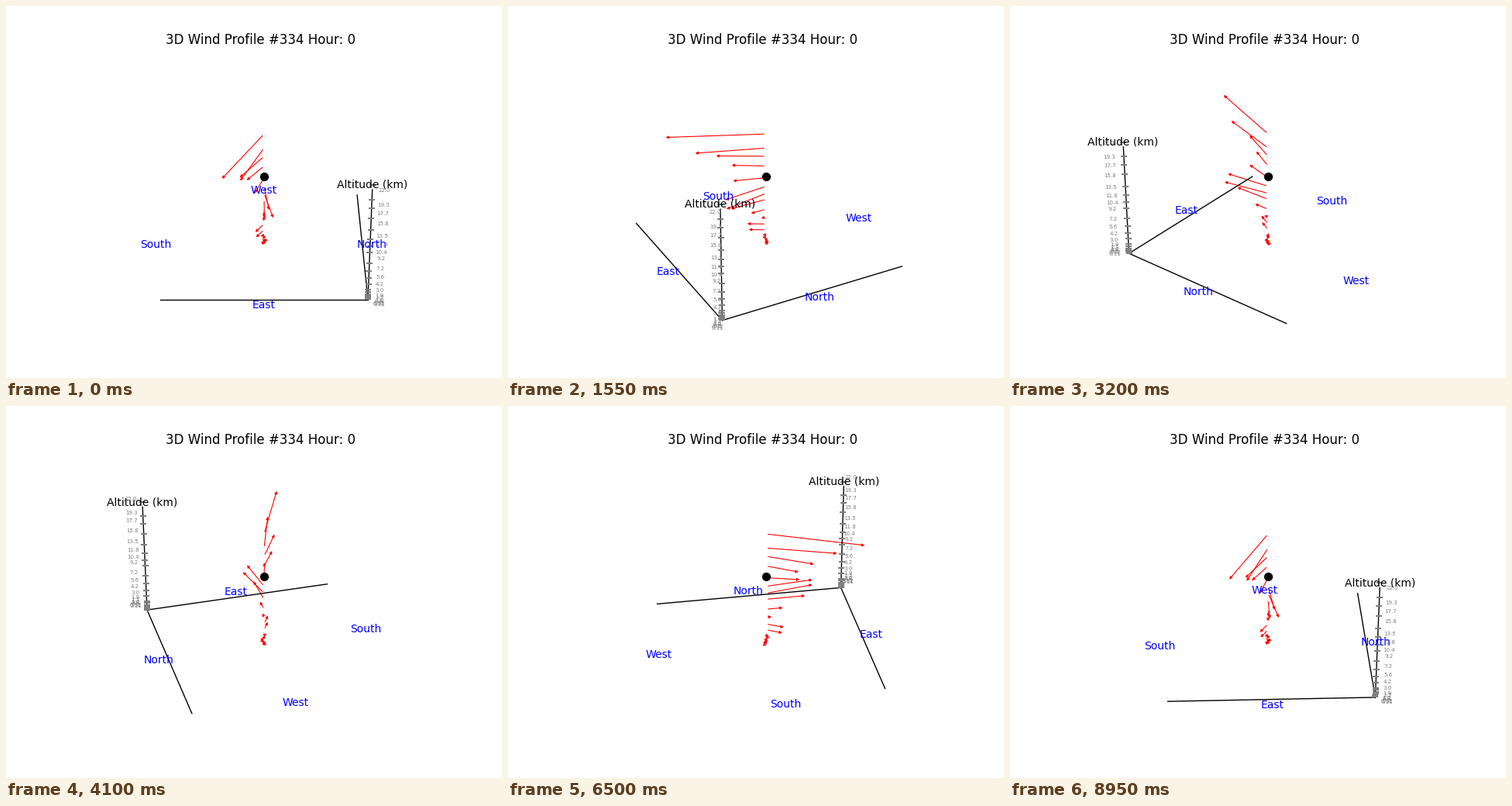
These frames come from a looping animation (640x480 px, 9000 ms). A matplotlib script:

```python
import numpy as np
import matplotlib.pyplot as plt
from matplotlib.animation import FuncAnimation
from matplotlib.patches import FancyArrowPatch

W, H = 640, 480
FRAMES, INTERVAL = 180, 50

# Camera: perspective from distance 10 at 30 degrees elevation
DIST, SCALE = 10, 369.6 / 0.185
CX, CY = 333.0, 237.8
ELEV = np.radians(30)

KM = 0.0374       # scene units per kilometre
EDGE = 0.6469     # half width of the ground square
OUT = 1.1 * EDGE  # where the labels sit

# Pressure levels in hPa, from the ground up
PRESSURE = np.r_[1000:899:-25, 850:799:-50, 700:299:-100, 250:99:-50,
                 70, 50, 27.6]


def altitude(p):
    """Barometric height in km, rounded for the scale."""
    z = 44.33 * (1 - (p / 1013.25) ** 0.1903)
    return round(float(z), 1 if z > 0.4 else 2)


def bump(z, mid, width):
    return np.exp(-((z - mid) / width) ** 2)


def wind(z):
    """East and north wind: ground swirl, low breeze, jet, rising flow aloft."""
    swirl = 0.035 * bump(z, 0, 2)
    turn = 4.1 - 3 * z
    low, high = bump(z, 3.6, 1.1), 0.05 * bump(z, 19.6, 1.1)
    east = (swirl * np.cos(turn) + 0.143 * low + 0.34 * bump(z, 11, 3.8)
            + 0.074 * max(z - 14, 0) + high)
    north = (swirl * np.sin(turn) - 0.09 * low + 0.1 * bump(z, 11.1, 1)
             - 0.023 * max(z - 10.6, 0) + high)
    return east, north


def project(points, azim):
    """Turn (east, north, km) points into stage pixels."""
    x, y, z = np.asarray(points, float).T
    z = (z - 11) * KM
    side = y * np.cos(azim) - x * np.sin(azim)
    near = x * np.cos(azim) + y * np.sin(azim)
    up = z * np.cos(ELEV) - near * np.sin(ELEV)
    depth = DIST - near * np.cos(ELEV) - z * np.sin(ELEV)
    return np.column_stack([CX + SCALE * side / depth,
                            CY - SCALE * up / depth])


fig = plt.figure(figsize=(W / 100, H / 100), dpi=100, facecolor="white")
ax = fig.add_axes([0, 0, 1, 1])
ax.set_xlim(0, W)
ax.set_ylim(H, 0)
ax.axis("off")
ax.text(328, 49.3, "3D Wind Profile #334 Hour: 0", fontsize=12, ha="center")

levels = [altitude(p) for p in PRESSURE]

corner = (EDGE, EDGE, 0)
axes_ends = [(-EDGE, EDGE, 0), (EDGE, -EDGE, 0), (EDGE, EDGE, 21.1)]
axis_lines = [ax.plot([], [], color="black", lw=1)[0] for _ in axes_ends]

tick_points = [(EDGE, EDGE, z) for z in levels]
ticks = ax.scatter(*project(tick_points, 0).T, marker="_", color="gray",
                   s=36, linewidth=1.5, zorder=3)

tails = [(0, 0, z) for z in levels]
tips = [(*wind(z), z) for z in levels]
arrows = [ax.add_patch(FancyArrowPatch((0, 0), (1, 1), arrowstyle="-|>",
                                       color="red", mutation_scale=5,
                                       lw=0.8, zorder=1.5))
          for _ in levels]

ax.scatter(*project([(0, 0, 13.7)], 0).T, s=50, color="black", zorder=4)

texts, text_points = [], []


def add_label(point, label, **style):
    texts.append(ax.text(0, 0, label, ha="center", va="center",
                         zorder=5, **style))
    text_points.append(point)


for k, name in enumerate(["East", "North", "West", "South"]):
    angle = k * np.pi / 2
    add_label((OUT * np.cos(angle), OUT * np.sin(angle), 0), name,
              color="blue")
add_label((EDGE, EDGE, levels[-1]), "Altitude (km)", color="black")
for z in levels:
    add_label((OUT, OUT, z), str(z), color="gray", fontsize=5)


def update(i):
    azim = 2 * np.pi * i / FRAMES
    for line, end in zip(axis_lines, axes_ends):
        line.set_data(*project([corner, end], azim).T)
    ticks.set_offsets(project(tick_points, azim))
    for arrow, a, b in zip(arrows, project(tails, azim), project(tips, azim)):
        arrow.set_positions(tuple(a), tuple(b))
    for text, pos in zip(texts, project(text_points, azim)):
        text.set_position(pos)
    return []


anim = FuncAnimation(fig, update, frames=FRAMES, interval=INTERVAL,
                     repeat=True, repeat_delay=0, blit=False)
plt.show()
```
